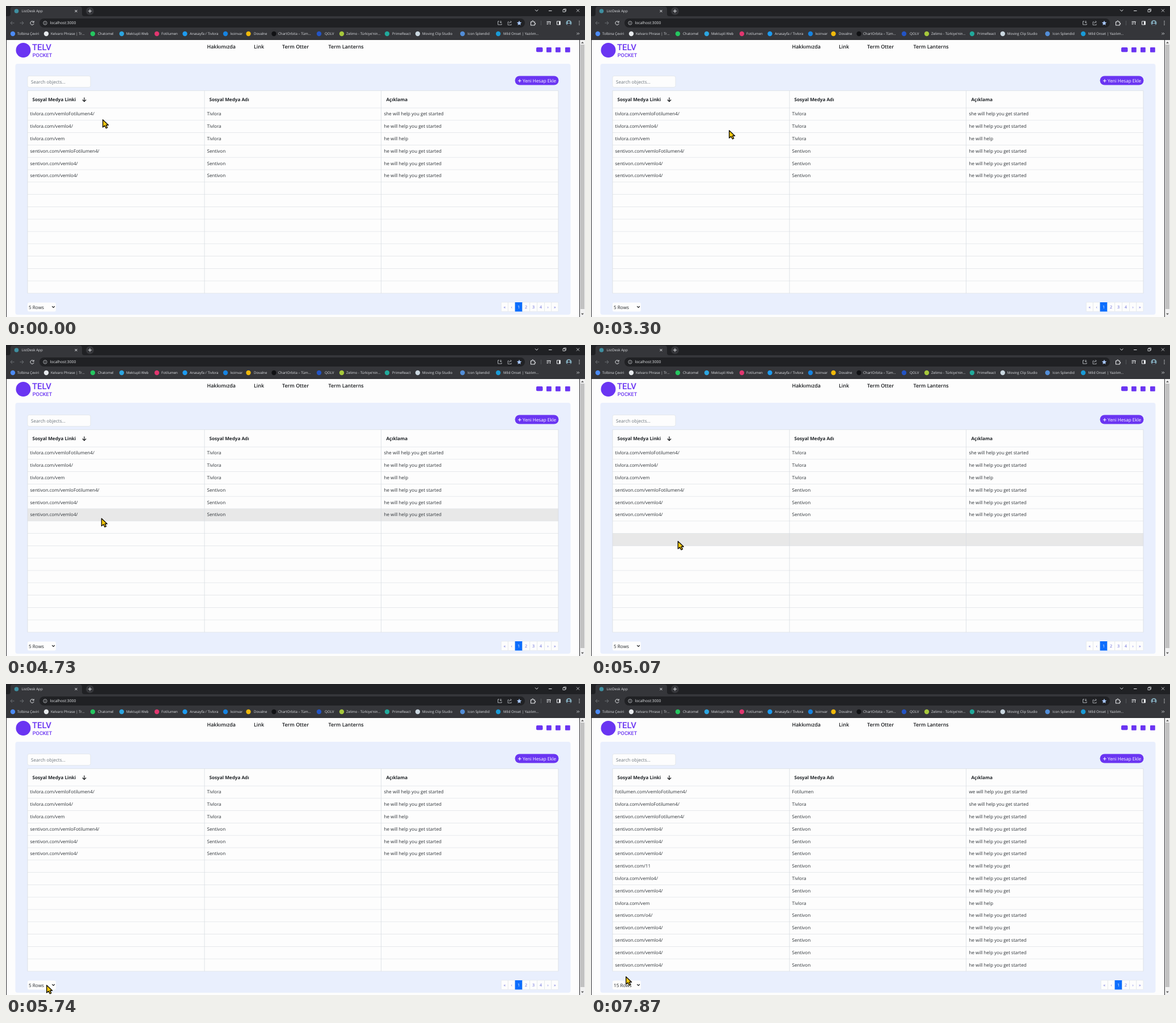
Write an HTML page that moves like this. It is 1021 by 549 pixels and loops after 8 s.

```html
<!DOCTYPE html>
<html lang="tr">
<head>
<meta charset="utf-8">
<title>ListDesk App</title>
<style>
  html, body { margin: 0; width: 100%; height: 100%; overflow: hidden; background: #fdfdfe; }
  svg { display: block; width: 1021px; height: 549px; }
  text { font-family: "Open Sans", "Noto Sans", sans-serif; text-rendering: geometricPrecision; white-space: pre; }
</style>
</head>
<body>
<svg id="stage" viewBox="0 0 1021 549"></svg>
<script>
const NS = 'http://www.w3.org/2000/svg';
const LOOP = 8000;
const PURPLE = '#6a35f2', BLUE = '#0d6efd', LINE = '#dee2e6', INK = '#2c3136';
const CHROME = '#35363a', EDGE = '#2b2c2f', PALE = '#e8eaed', PAPER = '#fdfdfd';
const TOP = 180, ROW = 21.8, ROWS = 15;
const stage = document.getElementById('stage');

function add(parent, tag, attrs) {
  const el = document.createElementNS(NS, tag);
  for (const key in attrs) el.setAttribute(key, attrs[key]);
  return parent.appendChild(el);
}
const group = (parent = stage) => add(parent, 'g', {});
const rect = (x, y, width, height, fill, rx = 0, extra = {}, parent = stage) =>
  add(parent, 'rect', { x, y, width, height, fill, rx, ...extra });
const dot = (cx, cy, r, fill, extra = {}) => add(stage, 'circle', { cx, cy, r, fill, ...extra });
const stroke = (d, color = PALE, width = 1, parent = stage) =>
  add(parent, 'path', { d, fill: 'none', stroke: color, 'stroke-width': width });
const shape = (d, fill) => add(stage, 'path', { d, fill });
function label(x, y, string, size, fill = INK, extra = {}, parent = stage) {
  const el = add(parent, 'text', { x, y, 'font-size': size, fill, ...extra });
  el.textContent = string;
  return el;
}

function drawTabStrip() {
  rect(0, 0, 1021, 60, CHROME);
  rect(0, 0, 1021, 18, '#202124');
  shape('M4 18Q8 18 8 14V5Q8 1 12 1H130Q134 1 134 5V14Q134 18 138 18Z', CHROME);
  dot(18.5, 9, 3.8, '#3f8fa0');
  label(27.5, 11.2, 'ListDesk App', 6.2, '#dfe1e5');
  stroke('M121.5 7l4 4m0-4l-4 4');
  dot(148, 9, 7, CHROME);
  stroke('M144.8 9h6.4M148 5.8v6.4');
  stroke('M933 6.5l2.7 2.7l2.7-2.7M957 8.5h5.5');
  stroke('M982 6.5h4v4h-4zM983.5 6.5v-1.3h4v4h-1.5', PALE, .8);
  stroke('M1006 5.5l5 5m0-5l-5 5', PALE, .8);
}

function drawToolbar() {
  rect(59, 22, 856, 16, '#202124', 8);
  stroke('M14.5 30H8m3-3l-3 3l3 3M24.5 30H31m-3-3l3 3l-3 3', '#6d7074');
  stroke('M48.7 28.2A3.2 3.2 0 1 0 49.2 31M49.2 26.5v2.4h-2.5');
  dot(69, 30, 3.2, 'none', { stroke: '#c4c7cb', 'stroke-width': .8 });
  stroke('M69 29.5v2.2M69 28v.8', '#c4c7cb', .8);
  label(77.5, 32.4, 'localhost:3000', 6.8, PALE);
  stroke('M870 27h-2.5v6h6.5v-2M872.5 26v4m-1.7-1.7l1.7 1.7l1.7-1.7', '#bdc1c6', .9);
  stroke('M887 28h-2v5.5h6v-2M887 31q.5-3 4-3m-1.5-1.8l1.8 1.8l-1.8 1.8', '#bdc1c6', .8);
  shape('M905 25.8l1.2 2.8l3 .3l-2.2 2l.6 3l-2.6-1.5l-2.6 1.5l.6-3l-2.2-2l3-.3z', '#a8c7fa');
  stroke('M925.5 28h2q0-2 1.3-2t1.3 2h2v2q1.6 0 1.6 1.2t-1.6 1.2v1.6h-6.6z', PALE, 1.1);
  rect(943, 26, .7, 8, '#5f6368');
  stroke('M953.5 27.5h6M953.5 29.7h4M953.5 32h3M959.5 33v-5h1.5');
  stroke('M971.5 27h6v6h-6z');
  rect(975, 27, 3, 6, PALE);
  dot(992.5, 30, 5, '#7fa6b5');
  dot(992.5, 28.5, 1.8, '#343138');
  shape('M988.8 33.2q3.7-5 7.4 0q-3.7 3.5-7.4 0z', '#343138');
  for (const y of [27, 30, 33]) dot(1011, y, .8, PALE);
}

function drawBookmarks() {
  const bookmarks = [
    [12, 20, 'Tolbina Çeviri', '#4c8bf5'], [71, 79, 'Kelvaro Phrase | Tr...', '#e6e9ec'],
    [153, 162, 'Chatomel', '#25c660'], [204, 212, 'Mektupli Web', '#2ca5e0'],
    [266, 274, 'Fotilumen', '#e0366f'], [315.5, 324, 'Anasayfa / Tivlora', '#1d9bf0'],
    [387, 396, 'koinvar', '#1683e0'], [427.5, 437, 'Dovalne', '#f0b90b'],
    [472.5, 480, 'ChartOrbita – Tüm...', '#101114'], [552, 562, 'QOLV', '#2354c4'],
    [592, 600, "Zelimo - Türkiye'nin...", '#a6c83c'], [672, 681, 'PrimeReact', '#21a99b'],
    [726, 734, 'Moving Clip Studio', '#c9d6df'], [805, 814, 'Icon Splendid', '#528dd7'],
    [868, 877, 'Mild Onset | Yazılım...', '#199ad6']
  ];
  for (const [iconX, textX, name, color] of bookmarks) {
    dot(iconX, 49, 4.2, color);
    label(textX, 51.2, name, 6.15, '#dfe1e5');
  }
  stroke('M1006.5 47l1.8 1.8l-1.8 1.8M1009 47l1.8 1.8l-1.8 1.8', PALE, .8);
}

function drawPage() {
  rect(0, 59, 1021, 490, EDGE);
  rect(1, 60, 1010, 489, PAPER);
  rect(1012, 60, 9, 489, '#f1f1f1');
  rect(1013, 68, 7, 467, '#c1c1c1');
  shape('M1014 66l2.5-3l2.5 3zM1014 542.5l2.5 3l2.5-3z', '#606060');

  dot(30.5, 78, 13, PURPLE);
  const logo = { style: 'font-family:Roboto,sans-serif', 'font-weight': 500 };
  label(46, 77.5, 'TELV', 15, PURPLE, logo);
  label(46.8, 90, 'POCKET', 9.1, PURPLE, logo);

  for (const [x, name] of [[354.5, 'Hakkımızda'], [437, 'Link'], [487, 'Term Otter'], [568.5, 'Term Lanterns']])
    label(x, 75, name, 8.9, '#15171a', { 'font-weight': 600 });
  rect(935, 73, 11.5, 8.2, PURPLE, 2);
  for (const x of [953, 969, 986]) rect(x, 73, 8.8, 8.8, PURPLE, 1);

  rect(16.5, 102, 979, 443, '#e9effd', 4);
  rect(38, 123.5, 111, 20, PAPER, 3, { stroke: LINE, 'stroke-width': .7 });
  label(44, 136.6, 'Search objects...', 8.1, '#6c757d');
  rect(897.5, 123.5, 77, 16, PURPLE, 8);
  stroke('M903 132h5.6M905.8 129.2v5.6', '#fff', 1.1);
  label(911, 135.1, 'Yeni Hesap Ekle', 8.1, '#fff');
}

function drawTable() {
  rect(38, 149.5, 936, 357.5, PAPER);
  const hover = rect(38, TOP, 936, ROW, '#e8e8e8');
  for (let i = 0; i <= ROWS; i++) rect(38, TOP + i * ROW - .4, 936, .8, '#e1e4e8');
  rect(38, 149.1, 936, .8, LINE);
  for (const x of [38, 350, 661.5, 974]) rect(x - .4, 149.5, .8, 357.5, '#d8dce2');
  for (const [x, name] of [[46.5, 'Sosyal Medya Linki'], [358.5, 'Sosyal Medya Adı'], [670.5, 'Açıklama']])
    label(x, 167.6, name, 8.15, '#212529', { 'font-weight': 700 });
  stroke('M138 161.5v7M134.8 165.5l3.2 3.2l3.2-3.2', '#15171a', 1.2);
  return hover;
}

const SITES = { F: 'Fotilumen', T: 'Tivlora', S: 'Sentivon' };
const LONG = 'vemloFotilumen4/', SHORT = 'vemlo4/';
const STARTED = 'he will help you get started', GET = 'he will help you get', HELP = 'he will help';
const plain = ['S', SHORT, STARTED];
const shortList = [
  ['T', LONG, 's' + STARTED], ['T', SHORT, STARTED], ['T', 'vem', HELP], ['S', LONG, STARTED], plain, plain
];
const longList = [
  ['F', LONG, 'we will help you get started'], ['T', LONG, 's' + STARTED], ['S', LONG, STARTED],
  plain, plain, plain, ['S', '11', GET], ['T', SHORT, STARTED], ['S', SHORT, GET], ['T', 'vem', HELP],
  ['S', 'o4/', STARTED], ['S', SHORT, GET], plain, plain, plain
];

function drawView(list, size, pages) {
  const view = group();
  list.forEach(([key, path, note], i) => {
    const y = TOP + i * ROW + 13.4, site = SITES[key];
    label(42.5, y, `${site.toLowerCase()}.com/${path}`, 8.08, INK, {}, view);
    label(354.5, y, site, 8.08, INK, {}, view);
    label(666.5, y, note, 8.08, INK, {}, view);
  });
  rect(38, 523.5, 50, 16, PAPER, 3, {}, view);
  label(40, 534.6, `${size} Rows`, 8.2, '#212529', {}, view);
  stroke('M81.3 530l2.3 2.3l2.3-2.3', '#212529', 1.2, view);

  const cells = ['«', '‹', ...Array.from({ length: pages }, (_, i) => String(i + 1)), '›', '»'];
  const widths = cells.map(c => c > '0' && c <= '9' ? 13 : 12.2);
  let x = 974 - widths.reduce((a, b) => a + b);
  cells.forEach((c, i) => {
    const active = c === '1';
    const border = active ? {} : { stroke: LINE, 'stroke-width': .6 };
    rect(x, 523, widths[i], 16.4, active ? BLUE : PAPER, active ? 0 : 1, border, view);
    label(x + widths[i] / 2, 534.2, c, 7.2, active ? '#fff' : '#6366d8', { 'text-anchor': 'middle' }, view);
    x += widths[i];
  });
  return view;
}

drawTabStrip();
drawToolbar();
drawBookmarks();
drawPage();
const hover = drawTable();
const views = [drawView(shortList, 5, 4), drawView(longList, 15, 2)];
const cursor = add(stage, 'path', {
  d: 'M.7.7V14L4 11.2L6.400 15.800L8.800 14.600L6.500 10.200H10.600Z',
  fill: '#f6c90e', stroke: '#16130a', 'stroke-width': 1.4, 'stroke-linejoin': 'round'
});

// Pointer tip: [ms, x, y]
const path = [
  [0, 170, 200], [30, 170, 200], [130, 241, 218], [2000, 241, 218], [2030, 243, 219], [3770, 243, 219],
  [4100, 193, 208], [4270, 193, 208], [4430, 185, 191], [4570, 185, 191], [4730, 168, 305],
  [4800, 153, 345], [5070, 153, 345], [5200, 112, 449], [5470, 82, 512], [5640, 82, 512],
  [5740, 71, 531], [6340, 71, 530], [6570, 64, 512], [7040, 63, 512], [7370, 66, 527],
  [7740, 66, 527], [7870, 61, 516], [LOOP, 61, 516]
];
const HOVER_FROM = 3770, SWITCH = 7040;

function pointer(t) {
  const i = path.findIndex(p => p[0] > t);
  const [t0, x0, y0] = path[i - 1], [t1, x1, y1] = path[i];
  const k = (t - t0) / (t1 - t0);
  return [x0 + (x1 - x0) * k, y0 + (y1 - y0) * k];
}
const show = (el, on) => el.setAttribute('visibility', on ? 'visible' : 'hidden');

const start = performance.now();
function draw() {
  const t = (performance.now() - start) % LOOP;
  const [x, y] = pointer(t);
  const row = Math.floor((y - TOP) / ROW);
  cursor.setAttribute('transform', `translate(${x} ${y})`);
  hover.setAttribute('y', TOP + row * ROW);
  show(hover, t >= HOVER_FROM && row >= 0 && row < ROWS);
  show(views[0], t < SWITCH);
  show(views[1], t >= SWITCH);
  requestAnimationFrame(draw);
}
draw();
</script>
</body>
</html>
```
